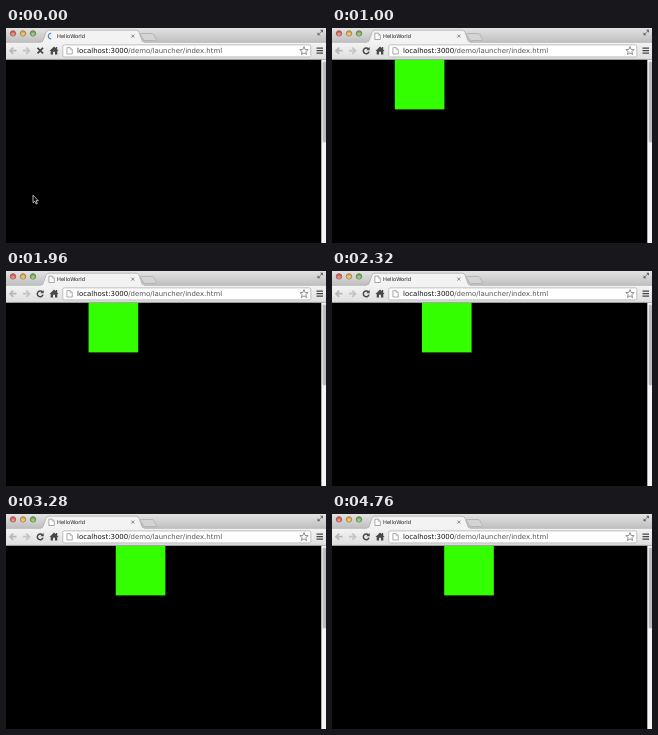
Recreate the animation shown at these times as an HTML page. Size 320x215 px, loop 4800 ms.

```html
<!DOCTYPE html>
<html lang="en">
<head>
<meta charset="utf-8">
<title>Sliding square</title>
<style>
html, body { margin: 0; width: 100%; height: 100%; overflow: hidden; background: #000; }
svg { display: block; width: 100vw; height: 100vh; }
text { font-family: "DejaVu Sans", sans-serif; }
</style>
</head>
<body>
<svg viewBox="0 0 320 215">
  <defs>
    <linearGradient id="frame" x2="0" y2="1"><stop stop-color="#e3e3e3"/><stop offset="1" stop-color="#bdbdbd"/></linearGradient>
    <linearGradient id="bar" x2="0" y2="1"><stop stop-color="#f3f3f3"/><stop offset="1" stop-color="#dedede"/></linearGradient>
    <radialGradient id="shine" cy=".7"><stop stop-color="#fff" stop-opacity=".45"/><stop offset="1" stop-color="#fff" stop-opacity="0"/></radialGradient>
    <g id="page">
      <path d="M.4 .4H3.8L5.8 2.4V6.8H.4Z" fill="#fff" stroke="#888" stroke-width=".7"/>
      <path d="M3.7 .5V2.5H5.7" fill="none" stroke="#999" stroke-width=".6"/>
    </g>
  </defs>
  <rect width="320" height="215"/>
  <rect id="square" y="31.500" width="49.600" height="49.900" fill="#3f0"/>

  <!-- window frame and tabs -->
  <rect width="320" height="15" fill="url(#frame)"/>
  <path d="M0 14.400H320" stroke="#a5a5a5" stroke-width=".6"/>
  <g stroke-width=".8">
    <circle cx="7" cy="5.400" r="2.700" fill="#dc5a52" stroke="#94504b"/>
    <circle cx="17" cy="5.400" r="2.700" fill="#e0a944" stroke="#94763f"/>
    <circle cx="27" cy="5.400" r="2.700" fill="#70ae50" stroke="#54773f"/>
  </g>
  <g fill="url(#shine)">
    <circle cx="7" cy="5.400" r="2.700"/>
    <circle cx="17" cy="5.400" r="2.700"/>
    <circle cx="27" cy="5.400" r="2.700"/>
  </g>
  <path d="M134.500 6.500Q134 5.500 135.200 5.500H146Q147.300 5.500 148 6.700L150.300 11.500Q150.700 12.500 149.500 12.500H139.500Q138 12.500 137.300 11.300Z" fill="#d4d4d4" stroke="#a4a4a4" stroke-width=".6"/>
  <path d="M34 14.800Q36.300 14.500 37.200 12.300L40 4.200Q40.800 2.200 43 2.200H130Q132.200 2.200 133 4.200L135.800 12.300Q136.700 14.500 139 14.800V15.200H34Z" fill="#f3f3f3" stroke="#a0a0a0" stroke-width=".6"/>
  <path d="M125.300 6.600L128.300 9.600M128.300 6.600L125.300 9.600" stroke="#777" stroke-width=".9"/>
  <text x="51" y="10.200" font-size="5.200" fill="#222">HelloWorld</text>
  <g stroke="#666" stroke-width=".8" fill="#666">
    <path d="M312 6.800L316.500 2.300" fill="none"/>
    <path d="M314 1.800H317V4.800ZM311.500 4.300V7.300H314.500Z" stroke="none"/>
  </g>

  <!-- toolbar -->
  <rect y="14.700" width="320" height="17" fill="url(#bar)"/>
  <path d="M35 14.700H138" stroke="#f3f3f3"/>
  <path d="M0 31.400H320" stroke="#999" stroke-width=".6"/>
  <g fill="none" stroke-width="1.700">
    <path d="M10.500 22.700H4.500M7.200 19.600L4 22.700L7.200 25.800" stroke="#b8b8b8"/>
    <path d="M17 22.700H23M20.300 19.600L23.500 22.700L20.300 25.800" stroke="#c4c4c4"/>
    <path id="stop" d="M31.500 19.800L37 25.300M37 19.800L31.500 25.300" stroke="#444"/>
    <g id="reload">
      <path d="M36.500 21A2.900 2.900 0 1 0 37 23.600" stroke="#484848" stroke-width="1.500"/>
      <path d="M37.700 18.900V22.300H34.300Z" fill="#484848"/>
    </g>
  </g>
  <path d="M43.500 22.900L48 18.500L49.800 20.200V19H51.200V21.600L52.500 22.900H51.300V26.400H49V23.700H47V26.400H44.700V22.900Z" fill="#484848"/>
  <rect x="56.800" y="16.900" width="248" height="12" rx="1.500" fill="#fff" stroke="#aaa" stroke-width=".7"/>
  <use href="#page" x="60.500" y="19.200"/>
  <text x="71" y="25.200" font-size="6.950" fill="#555"><tspan fill="#111">localhost:3000</tspan>/demo/launcher/index.html</text>
  <path id="star" fill="#fff" stroke="#777" stroke-width=".8"/>
  <path d="M310.500 20.200H317M310.500 22.700H317M310.500 25.200H317" stroke="#444" stroke-width="1.300"/>

  <!-- scrollbar -->
  <rect x="315.300" y="31.700" width="4.700" height="183.300" fill="#f6f6f6"/>
  <rect x="316.700" y="33.500" width="3.300" height="81" rx="1.500" fill="#bcbcbc"/>

  <use id="icon" href="#page" x="42.500" y="4.700"/>
  <path id="spinner" d="M45.200 5.200A2.900 2.900 0 0 0 45.200 11" fill="none" stroke="#4a7fc6" stroke-width="1.100"/>
  <path id="cursor" d="M0 0V7.500L1.700 6L3 8.800L4.300 8.200L3 5.500H5.300Z" fill="#000" stroke="#fff" stroke-width=".7"/>
</svg>
<script>
const LOOP = 4800, STEP = 40, SHOWN = 120, LOADED = 560;
const el = id => document.getElementById(id);
const clamp = (v, lo, hi) => Math.min(hi, Math.max(lo, v));
const show = (id, on) => el(id).setAttribute("visibility", on ? "visible" : "hidden");

function starPath(cx, cy, outer, inner) {
  let d = "";
  for (let i = 0; i < 10; i++) {
    const a = (i / 5 - 0.5) * Math.PI, r = i % 2 ? inner : outer;
    d += (i ? "L" : "M") + (cx + r * Math.cos(a)) + " " + (cy + r * Math.sin(a));
  }
  return d + "Z";
}

// The motion pauses briefly twice, as it does while the page settles.
function hold(t) {
  if (t > 560 && t < 680) return 560;
  if (t > 1160 && t < 1240) return 1160;
  return t;
}

function draw(time) {
  const t = Math.floor(time / STEP) * STEP;
  const loading = t < LOADED;
  show("spinner", loading);
  show("stop", loading);
  show("icon", !loading);
  show("reload", !loading);
  show("square", t >= SHOWN);
  el("spinner").setAttribute("transform", `rotate(${t * 0.36} 45.2 8.1)`);
  el("square").setAttribute("x", Math.min(112.2, 62.8 + (hold(t) - 1000) * 0.0206));
  const away = clamp((t - 200) / 280, 0, 1);
  el("cursor").setAttribute("transform", `translate(${27 - 35 * away} 167.2)`);
}

el("star").setAttribute("d", starPath(298, 23, 4.4, 1.9));

function tick(now) {
  draw(now % LOOP);
  requestAnimationFrame(tick);
}
draw(0);
requestAnimationFrame(tick);
</script>
</body>
</html>
```
